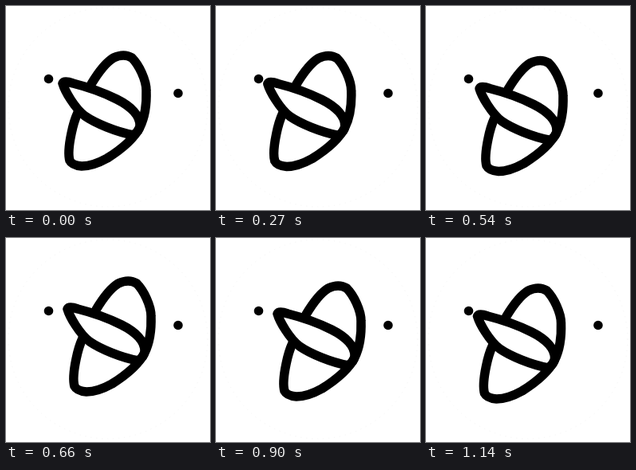
Recreate the animation shown at these times as an HTML page. Size 256 px wide and 256 px high, loop 1.17 s.

```html
<!DOCTYPE html>
<html lang="en">
<head>
<meta charset="utf-8">
<title>Shaking doodle</title>
<style>
  html, body { margin: 0; height: 100%; overflow: hidden; background: #fff; }
  svg { display: block; width: 100vw; height: 100vh; }
</style>
</head>
<body>
<svg viewBox="0 0 256 256">
  <circle cx="128" cy="127" r="125" fill="none" stroke="#f4f4f4" stroke-dasharray="1 6"/>
  <g id="doodle" fill="none" stroke="#000" stroke-width="11.5" stroke-linecap="round" stroke-linejoin="round">
    <path d="M107 98C116 83 125 71 135 65Q148 59 158 65C167 74 176 93 176 106Q177 134 168 152
             C160 168 143 181 127 191Q109 201 95 201Q83 200 80 194Q77 184 82 160Q85 145 90 134"/>
    <path d="M160 162C138 158 112 147 99 138C86 128 74 107 71 97Q73 93 84 97
             C104 102 123 109 139 117C157 126 169 138 168 151Q167 157 160 162"/>
  </g>
  <circle cx="53.5" cy="91.5" r="5.8"/>
  <circle cx="216" cy="109.5" r="5.8"/>
</svg>
<script>
const LOOP = 1170, STEP = 30;
const doodle = document.getElementById('doodle');

// Shake poses: time, x, y
const poses = [
  [0, 0, 0], [90, 13, -8], [180, -1.5, .5], [240, -13, 7], [330, 14, -19],
  [390, -7, -12], [450, -13, 0], [480, 3, 8], [540, -4, 6.5], [600, -12, 8],
  [660, 6, -8], [720, 12, -20], [780, .5, -4], [840, -5, 8], [900, 6, -2],
  [960, 12, -10], [1020, -8, -4], [1080, 4, -7], [1110, -14, 3],
  [1140, -6.5, 1], [LOOP, 0, 0]
];

function offsetAt(time) {
  const next = poses.findIndex(pose => pose[0] > time);
  const a = poses[next - 1], b = poses[next];
  const ease = (1 - Math.cos(Math.PI * (time - a[0]) / (b[0] - a[0]))) / 2;
  return [1, 2].map(i => a[i] + (b[i] - a[i]) * ease);
}

function draw() {
  const time = Math.floor(performance.now() % LOOP / STEP) * STEP;
  doodle.setAttribute('transform', `translate(${offsetAt(time)})`);
  requestAnimationFrame(draw);
}
draw();
</script>
</body>
</html>
```
